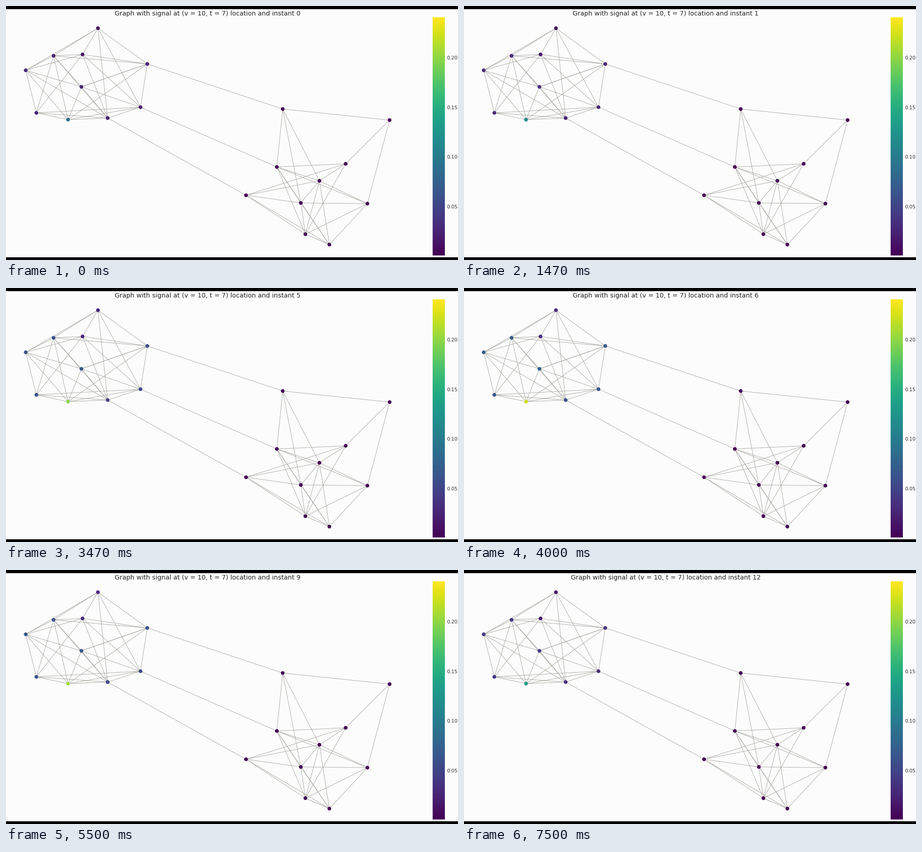
Recreate the animation shown at these times as a matplotlib script. Size 998 by 561 pixels, loop 8 s.

```python
import numpy as np
import matplotlib.pyplot as plt
from matplotlib.animation import FuncAnimation
from matplotlib.collections import LineCollection
from matplotlib.patches import Rectangle

W, H, DPI = 998, 561, 128
PX = 72 / DPI            # points per pixel
INTERVAL, LOOP = 100, 8000
VMAX = 0.24
INK = "#262626"

# name: (x, y, share of the pulse)
NODES = {
    "A": (203, 49, .14), "B": (105, 110, .31), "C": (169, 107, .14),
    "D": (312, 128, .30), "E": (43.5, 142, .32), "F": (166.5, 178.5, .33),
    "G": (67, 236, .31), "H": (137, 251, 1), "I": (224.5, 247.5, .24),
    "J": (297, 223.5, .27),
    "K": (611, 227.5, 0), "L": (847, 252, 0), "M": (598, 355.5, 0),
    "N": (750, 348.5, 0), "O": (692, 386, 0), "P": (530, 418, 0),
    "Q": (651, 435, 0), "R": (798, 436.5, 0), "S": (661, 504, 0),
    "T": (714, 527, 0),
}
# each node followed by its neighbours
EDGES = """A:BECIJD B:CDFIGHE C:DEGIJ D:FHJK E:FIHG F:DHIJ G:HIJ H:IJ I:JP J:M
K:LMQO L:NR M:NORSQT N:OPS O:PQRST P:QST Q:RST R:ST S:T"""
# times in ms at which the instant counter goes up by one
STEPS = [1000, 1500, 2000, 2500, 3100, 3600, 4200, 4700, 5300, 5900, 6500, 7000]

data = np.array(list(NODES.values()))
xy, share = data[:, :2], data[:, 2]


def signal(instant):
    """Node values: a heavy-tailed pulse in time, spread over the neighbours."""
    pulse = 1 / (1 + (abs(instant - 7.2) / 5.39) ** 1.7)
    return VMAX * share * np.where(share == 1, pulse, pulse ** 1.15)


fig = plt.figure(figsize=(W / DPI, H / DPI), dpi=DPI, facecolor="#fcfcfd")
ax = fig.add_axes([0, 0, 1, 1])
ax.axis("off")

# graph
pairs = [(g[0], b) for g in EDGES.split() for b in g[2:]]
segments = [[NODES[a][:2], NODES[b][:2]] for a, b in pairs]
ax.add_collection(LineCollection(segments, colors="#a6a69e", linewidths=0.95 * PX, zorder=1))
dots = ax.scatter(*xy.T, c=signal(0), cmap="viridis", vmin=0, vmax=VMAX,
                  s=(8.2 * PX) ** 2, linewidths=0, zorder=2)

# colour bar
ax.imshow(np.linspace(1, 0, 256)[:, None], cmap="viridis", aspect="auto",
          extent=(942.5, 969.5, 551.5, 25.5), interpolation="bilinear")
for k in range(1, 5):
    ax.text(973.5, 552 - 109.5 * k, f"{0.05 * k:.2f}", color=INK, family="DejaVu Sans",
            fontsize=10.6 * PX, va="center_baseline", ha="left")

# letterbox bars
for y in (0, 555):
    ax.add_patch(Rectangle((0, y), W, 6.5, color="black", linewidth=0, zorder=3))

title = ax.text(445.5, 20.5, "", color=INK, family="DejaVu Sans",
                fontsize=14.15 * PX, ha="center", va="baseline")
ax.set(xlim=(0, W), ylim=(H, 0))


def draw(frame):
    instant = sum(frame * INTERVAL >= t for t in STEPS)
    title.set_text(f"Graph with signal at (v = 10, t = 7) location and instant {instant}")
    dots.set_array(signal(instant))
    return title, dots


anim = FuncAnimation(fig, draw, frames=LOOP // INTERVAL, interval=INTERVAL,
                     repeat=True, repeat_delay=0)
plt.show()
```
